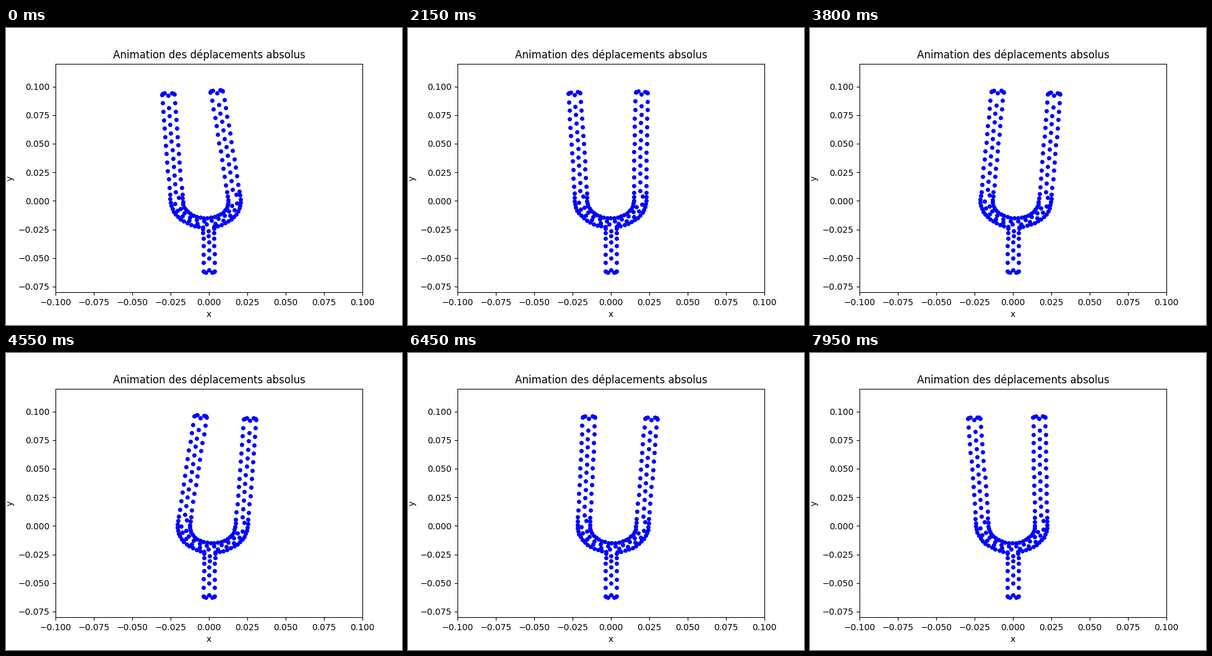
A matplotlib script for the animation above (8000 ms loop, 640 by 480 pixels).

```python
import numpy as np
import matplotlib.pyplot as plt
from matplotlib.animation import FuncAnimation

FRAMES, STEP = 160, 50          # one loop: 160 * 50 ms

# Fork geometry in mm
R_OUT, R_IN, TOP = 23.0, 15.0, 94.3
R_MID = (R_OUT + R_IN) / 2
JOINT, FOOT, HALF = -23.5, -61.4, 3.55
PITCH = 7.4                     # node spacing on straight edges


def grid(xs, ys):
    return [(x, y) for x in xs for y in ys]


def cap(x0, x1, y, out):
    """Rounded end between x0 and x1, pointing up (1) or down (-1)."""
    pts = [((x0 + x1) / 2, y - 1.1 * out)]
    for inset, rise in ((0.5, 0.65), (1.7, 1.2)):
        pts += grid((x0 + inset, x1 - inset), [y + rise * out])
    return pts


def arc(radius, start, stop, count):
    a = np.radians(np.linspace(start, stop, count))
    return list(zip(-radius * np.cos(a), -radius * np.sin(a)))


def prong(side):
    x0, x1 = sorted((side * R_IN, side * R_OUT))
    rows = TOP - PITCH * np.arange(12)
    base = rows[-1] * np.array([0.25, 0.53])
    pts = grid((x0, x1), np.append(rows, base))
    pts += grid([side * R_MID], rows[:-1] - 1.55 * PITCH)
    pts += [(side * R_MID + 1.6, 4.0)]
    return pts + cap(x0, x1, TOP, 1)


def bow():
    pts = arc(R_IN, 0, 180, 21)
    pts += arc(R_OUT, 0, 81, 13) + arc(R_OUT, 99, 180, 13)
    # two staggered rows inside the curve
    return pts + arc(17.7, 18, 162, 10) + arc(20.5, 4, 170, 11)


def stem():
    gaps = np.minimum(3.7 + 1.3 * np.arange(6), PITCH)
    rows = -24.2 - np.append(0, np.cumsum(gaps))
    mids = (rows[:-1] + rows[1:]) / 2
    pts = grid((-HALF, HALF), rows) + grid([0], mids[:-1])
    return pts + cap(-HALF, HALF, FOOT, -1)


nodes = np.array(prong(-1) + prong(1) + bow() + stem()) / 1000
x, y = nodes.T


def sway_mode():
    """Both prongs lean the same way, unit motion at the tips."""
    joint, foot = JOINT / 1000, FOOT / 1000
    free = np.clip((y - foot) / (joint - foot), 0, 1)
    lean = 0.21 + np.where(y > 0, 8.3, 7.4) * y
    held = (0.21 + 7.4 * joint) * free ** 2
    return np.array([np.where(y > joint, lean, held), -6.0 * x * free])


def spread_mode():
    """The prongs open and close, unit motion at the tips."""
    s = np.clip(y * 1000 / TOP, 0, None)
    mid = R_MID / 1000
    bend = 0.08 + 0.62 * s + 0.30 * s ** 2
    turn = (0.62 + 0.60 * s) / (TOP / 1000)
    fade = np.clip(1 - y * 1000 / JOINT, 0, 1)
    u = np.where(y > 0, bend * np.sign(x), 0.08 * fade * x / mid)
    v = np.where(y > 0, -turn * (np.abs(x) - mid), 0)
    return np.array([u, v])


SWAY, SPREAD = sway_mode(), spread_mode()


def pose(t):
    sway = -0.0109 * np.cos(0.643 * t)
    spread = -0.0032 * np.cos(1.283 * t)
    return nodes.T + sway * SWAY + spread * SPREAD


fig, ax = plt.subplots(figsize=(6.4, 4.8), dpi=100)
ax.set_xlim(-0.1, 0.1)
ax.set_ylim(-0.08, 0.12)
ax.set_xlabel("x")
ax.set_ylabel("y")
ax.set_title("Animation des déplacements absolus")
dots, = ax.plot(*pose(0), "bo", markersize=4)


def update(i):
    dots.set_data(*pose(i * STEP / 1000))
    return dots,


anim = FuncAnimation(fig, update, frames=FRAMES, interval=STEP,
                     repeat=True, repeat_delay=0)
plt.show()
```
